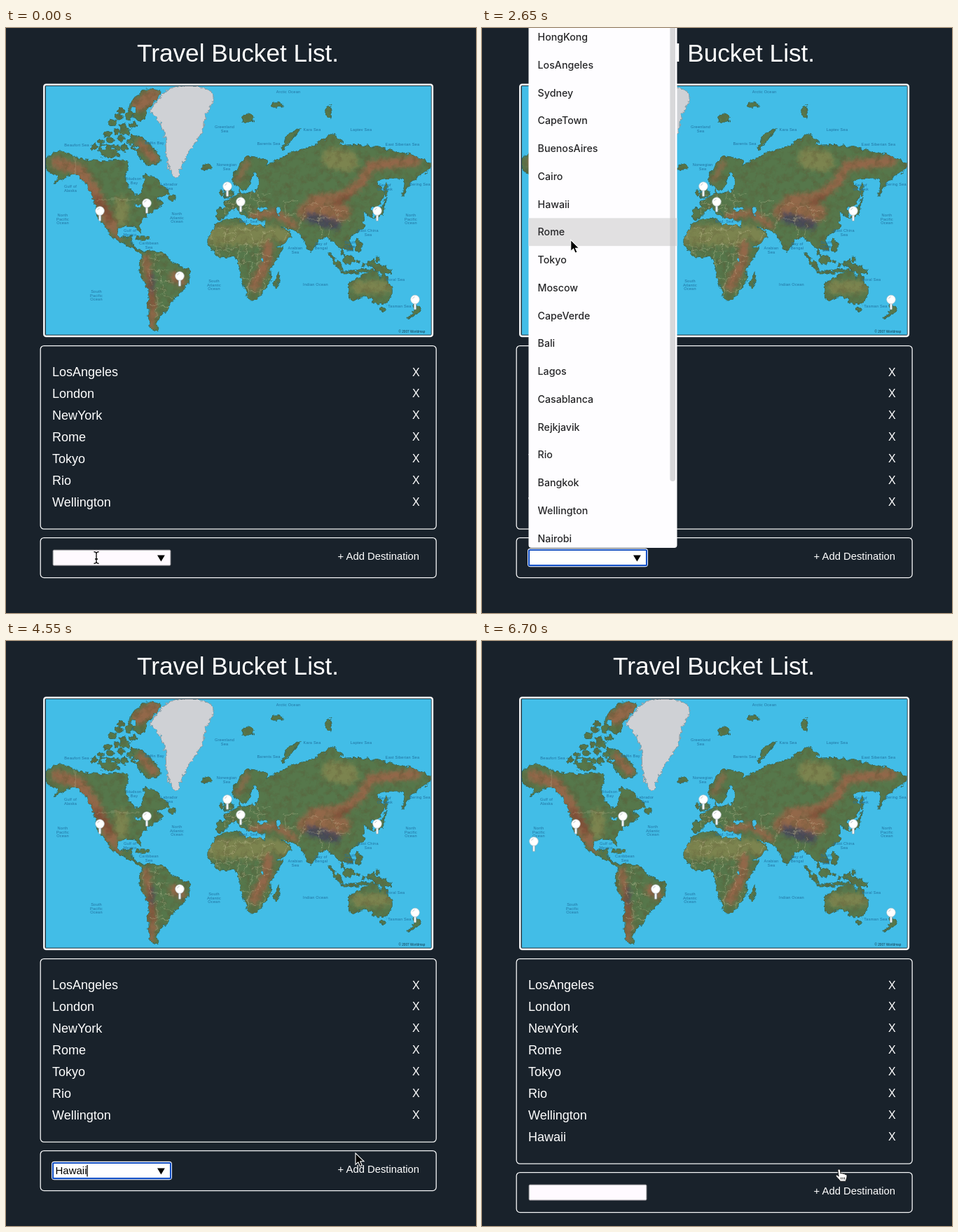
Write an HTML page that moves like this. It is 671x835 px and loops after 7050 ms.

```html
<!DOCTYPE html>
<html lang="en">
<head>
<meta charset="utf-8">
<title>Travel Bucket List</title>
<style>
html, body { margin: 0; width: 100%; height: 100%; overflow: hidden; background: #19222b; }
svg { position: absolute; left: 0; top: 0; width: 671px; height: 835px; }
#map { will-change: transform; }
text { font-family: "Liberation Sans", Arial, sans-serif; fill: #fff; }
.item { font-size: 18px; }
.cross { font-size: 16px; }
.sea { font-size: 5.6px; fill: #20719f; letter-spacing: .22px; text-anchor: middle; }
.option { font-family: Inter, Roboto, sans-serif; font-size: 14.2px; font-weight: 500; fill: #262628; }
.panel { fill: none; stroke: #f4f5f6; stroke-width: 1.3; }
</style>
</head>
<body>
<svg id="map" viewBox="0 0 671 835">
  <defs>
    <clipPath id="landClip"><path id="landShape"/></clipPath>
    <clipPath id="frameClip"><rect x="57" y="83" width="549.8" height="354.8"/></clipPath>
    <filter id="coast" filterUnits="userSpaceOnUse" x="50" y="76" width="564" height="370" color-interpolation-filters="sRGB">
      <feTurbulence type="fractalNoise" baseFrequency=".15" numOctaves="3" seed="4"/>
      <feColorMatrix values="1 0 0 0 0  0 1 0 0 0  0 0 1 0 0  0 0 0 0 1" result="n"/>
      <feDisplacementMap in="SourceGraphic" in2="n" scale="8" xChannelSelector="R" yChannelSelector="G"/>
    </filter>
    <filter id="soft" filterUnits="userSpaceOnUse" x="50" y="76" width="564" height="370"><feGaussianBlur stdDeviation="3"/></filter>
    <filter id="grain" filterUnits="userSpaceOnUse" x="50" y="76" width="564" height="370" color-interpolation-filters="sRGB">
      <feTurbulence type="fractalNoise" baseFrequency=".1" numOctaves="4" seed="9"/>
      <feColorMatrix values="0 0 0 0 .36  0 0 0 0 .33  0 0 0 0 .2  2 0 0 0 -.9"/>
    </filter>
  </defs>
  <rect width="671" height="835" fill="#19222b"/>
  <text x="187" y="47.5" font-size="35.2">Travel Bucket List.</text>
  <rect x="54.3" y="80.8" width="554.6" height="359.2" rx="3" fill="#1b3440" stroke="#f6f7f7" stroke-width="2.5"/>
  <g clip-path="url(#frameClip)">
    <rect x="57" y="83" width="550" height="355" fill="#42bde7"/>
    <g filter="url(#coast)">
      <path id="shore" stroke="#34685e" stroke-width="1.6" stroke-linejoin="round"/>
      <g clip-path="url(#landClip)">
        <rect x="50" y="76" width="564" height="370" fill="#56774b"/>
        <g id="terrain" filter="url(#soft)" fill="none" stroke-linecap="round"></g>
        <rect x="50" y="76" width="564" height="370" filter="url(#grain)" opacity=".6"/>
        <path id="borders" fill="none" stroke="#e3d9b4" stroke-opacity=".4" stroke-width=".7"/>
      </g>
      <path id="ice" fill="#cfd1d5" stroke="#8a999f"/>
      <path id="lakes" fill="#42bde7" stroke="#34685e" stroke-width=".7"/>
    </g>
    <g id="seas"></g>
    <text x="560.5" y="434.8" font-size="4.7" style="fill:#12384a">© 2007 Worldmap</text>
  </g>
</svg>
<svg id="ui" viewBox="0 0 671 835">
  <g id="pins"></g>
  <rect id="listBox" class="panel" x="49.2" y="453.6" width="565" height="261.6" rx="5"/>
  <g id="list"></g>
  <g id="form">
    <rect class="panel" x="49.2" y="727.6" width="565" height="57" rx="5"/>
    <rect id="ring" x="65" y="742.8" width="172" height="26.4" rx="4" fill="#fff"/>
    <rect id="field" x="67" y="745" width="168" height="22.2" rx="1.5"/>
    <text id="value" x="70.5" y="761" font-size="15" style="fill:#000">Hawaii</text>
    <path id="caret" stroke="#000" stroke-width="1.3"/>
    <path id="drop" d="M216 752.4H226.8L221.4 761.4Z" fill="#000"/>
    <text x="473.6" y="759" font-size="14.8">+ Add Destination</text>
  </g>
  <g id="menu">
    <path d="M66.5 -5H278.5V738Q278.5 742 274.5 742H70.5Q66.5 742 66.5 738Z" fill="#fefdff"/>
    <rect id="hover" x="66.5" width="212" height="39.8" fill="#e1e0e1"/>
    <g id="options"></g>
    <rect id="bar" x="268.4" y="-10" width="7.6" height="657" rx="3.8" fill="#c6c6c8"/>
  </g>
  <g id="cursor">
    <path id="beam" d="M-3.6 -8.4Q-.4 -8.4 0 -6Q.4 -8.4 3.6 -8.4M0 -6.5V6.5M-3.6 8.4Q-.4 8.4 0 6Q.4 8.4 3.6 8.4M-2 2H2" fill="none" stroke="#000" stroke-width="1.3"/>
    <path id="arrow" d="M0 0V16.2L3.8 12.8 6.4 18.8 9.3 17.5 6.8 11.8H12Z" fill="#000" stroke="#fff" stroke-width="1.1"/>
    <path id="hand" d="M-2 1.5C-2 -.4 1.2 -.4 1.4 1.4L2 6.2C3.3 5 5 5.4 5.3 6.7 6.6 5.9 8.1 6.5 8.4 7.7 9.7 7.2 11 8 11 9.6 11.2 12.5 9.8 14 9.4 17.2H1.6C0 14.5 -2.6 12.6 -4.6 9.9 -5.2 8.4 -3.2 7.6 -2 9L-.8 10.2ZM2.7 11.5V14.5M5.2 11.5V14.5M7.6 11.5V14.5" fill="#fff" stroke="#111" stroke-width=".9" stroke-linejoin="round"/>
  </g>
</svg>
<script>
const $ = id => document.getElementById(id);
const set = (el, attrs) => { for (const k in attrs) el.setAttribute(k, attrs[k]); return el; };
const make = (parent, tag, attrs, text) => {
  const el = set(document.createElementNS('http://www.w3.org/2000/svg', tag), attrs);
  if (text) el.textContent = text;
  parent.appendChild(el);
  return el;
};
const show = (el, on) => el.setAttribute('visibility', on ? 'inherit' : 'hidden');

let seed = 7;
const rand = () => (seed = seed * 16807 % 2147483647) / 2147483647;
const jitter = r => (rand() - .5) * 2 * r;

// closed smooth curve through a few key points
function blob(text) {
  const n = text.split(' ').map(Number), count = n.length / 2;
  const at = i => { const k = (i + count) % count * 2; return [n[k], n[k + 1]]; };
  let d = 'M' + at(0);
  for (let i = 0; i < count; i++) {
    const [a, b, c, e] = [at(i - 1), at(i), at(i + 1), at(i + 2)];
    const bend = (p, q, r, s) => [0, 1].map(j => p[j] + s * (r[j] - q[j]) / 8);
    d += `C${bend(b, a, c, 1)} ${bend(c, b, e, -1)} ${c}`;
  }
  return d + 'Z';
}
const oval = (x, y, a, b) => `M${x - a} ${y}a${a} ${b} 0 1 0 ${2 * a} 0a${a} ${b} 0 1 0 ${-2 * a} 0Z`;

const coasts = {
  northAmerica: '58 186 77 176 112 188 150 190 174 191 170 217 188 240 196 226 199 208 214 216 232 235 216 243 222 251 198 269 191 281 192 293 185 284 163 284 159 296 172 300 180 296 178 304 187 316 198 319 194 323 174 310 153 300 141 281 132 272 127 248 112 220 96 208 70 221 75 212 60 204',
  southAmerica: '198 320 222 321 241 337 263 349 255 371 241 384 231 400 217 415 216 431 206 426 203 400 204 374 190 346',
  ellesmere: '178 108 198 88 221 92 204 114 194 132 178 122',
  baffin: '178 152 203 164 220 188 202 196 188 178',
  victoria: '133 168 153 169 160 183 138 183',
  novaya: '394 174 402 155 420 143 404 164',
  britain: '313 241 316 222 325 238',
  madagascar: '382 366 391 349 386 371',
  japan: '526 271 537 258 541 244 538 265',
  sumatra: '461 321 480 342 476 345',
  guinea: '516 333 540 340 551 350 528 346',
  zealand: '583 394 591 401 586 409 572 414 584 404',
  australia: '490 372 492 363 518 349 530 348 534 358 538 348 550 373 544 391 528 393 516 383 494 388',
  africa: '302 278 330 272 348 282 370 285 387 314 396 313 378 343 378 360 360 385 347 387 337 357 328 327 305 327 289 306',
  europe: '302 270 301 259 313 257 312 248 331 238 334 230 338 237 356 233 362 221 354 205 346 226 340 231 325 220 326 206 346 184 372 190 372 197 398 185 412 210 405 270 372 276 358 272 346 270 338 258 343 270 326 258 308 272',
  siberia: '398 186 418 175 440 168 464 152 480 161 478 167 508 167 546 174 572 180 606 193 598 206 577 220 566 240 568 216 530 218 540 236 528 252 470 262 402 256',
  asia: '530 248 521 258 524 270 510 262 510 284 490 300 494 315 480 316 484 330 475 312 460 299 446 303 434 318 420 294 390 282 406 294 400 305 382 312 370 284 376 270 400 240'
};
const isles = [
  [237, 242, 5, 4], [195, 300, 10, 2], [287, 199, 7, 4], [345, 129, 9, 6], [386, 110, 8, 3], [461, 120, 4, 9],
  [308, 235, 3, 4], [503, 311, 4, 10], [489, 331, 7, 7], [537, 402, 3, 2.5], [543, 230, 2, 10]
];
// scattered islands: Arctic archipelago, then the Indonesian arc
for (let y = 116; y < 182; y += 11)
  for (let x = 170 - (y - 112) * .75; x < 182; x += 14)
    isles.push([x + jitter(3), y + jitter(3), 5 + jitter(1.5), 4 + jitter(1)]);
for (let x = 484; x < 520; x += 7)
  isles.push([x, 348 + jitter(2), 4, 1.4], [x + 12, 334 + jitter(5), 2, 2.4]);

const land = Object.values(coasts).map(blob).join('') + isles.map(p => oval(...p)).join('');
$('landShape').setAttribute('d', land);
$('shore').setAttribute('d', land);
$('ice').setAttribute('d', blob('206 117 232 88 262 81 294 92 294 108 285 124 280 148 262 176 252 194 244 214 234 204 229 180 227 154 216 128'));
$('lakes').setAttribute('d', oval(366, 258, 7, 3) + oval(389, 260, 3, 7) + oval(189, 253, 5, 2) + oval(366, 331, 2.4, 2.8));

// soft ridges: colour, width, course
const ridges = {
  '#7b8450': ['30 M300 296H362', '20 M380 290L396 298', '18 M502 370H540', '30 M466 186L488 190', '20 M165 250V272'],
  '#93684a': ['17 M72 192L106 203 128 238 150 282', '8 M150 282L160 300', '20 M190 110L210 96', '12 M192 165L212 188', '11 M199 328L205 360 210 400 206 425',
    '15 M374 310L372 335 354 368', '14 M240 355L250 362', '10 M352 268L385 264 412 282', '24 M428 262L480 264', '14 M436 246L482 240 506 222 522 196 585 190', '6 M330 218L345 192'],
  '#7d4b34': ['9 M129 242L150 272', '5 M204 350L210 400', '7 M470 250L490 240'],
  '#474958': ['15 M434 270L470 281', '4 M209 352V376']
};
for (const stroke in ridges) for (const ridge of ridges[stroke]) {
  const [width, ...d] = ridge.split(' ');
  make($('terrain'), 'path', { d: d.join(' '), stroke, 'stroke-width': width });
}

// wobbly mesh of frontiers, cut to the land
function mesh(x, y, w, h, step) {
  let d = '';
  for (let i = x; i < x + w; i += step)
    for (let j = y; j < y + h; j += step) {
      const s = step * .3;
      d += `M${i + jitter(s)} ${j + jitter(s)}l${step} ${jitter(s)}M${i + jitter(s)} ${j + jitter(s)}l${jitter(s)} ${step}`;
    }
  return d;
}
$('borders').setAttribute('d', 'M129 245H192M99 184V209' + mesh(296, 288, 84, 90, 17) + mesh(310, 235, 55, 34, 13) + mesh(200, 326, 36, 80, 18) + mesh(400, 254, 80, 36, 22));

const seas = [
  [403,91,'Arctic Ocean'], [312,141,'Greenland|Sea'], [437,145,'Kara Sea'], [507,145,'Laptev Sea'], [375,165,'Barents Sea'],
  [566,166,'East Siberian Sea'], [101,167,'Beaufort Sea'], [212,164,'Baffin Bay'], [315,195,'Norwegian|Sea'], [183,215,'Hudson|Bay'],
  [233,223,'Labrador|Sea'], [92,226,'Gulf of|Alaska'], [591,223,'Bering Sea'], [541,224,'Sea of|Okhotsk'], [81,267,'North|Pacific|Ocean'],
  [244,265,'North|Atlantic|Ocean'], [578,267,'North|Pacific|Ocean'], [177,289,'Gulf of|Mexico'], [204,307,'Caribbean|Sea'],
  [129,376,'South|Pacific|Ocean'], [297,361,'South|Atlantic|Ocean'], [442,366,'Indian Ocean'], [413,314,'Arabian|Sea'],
  [450,308,'Bay of|Bengal'], [491,306,'South|China|Sea'], [517,289,'East China|Sea'], [556,359,'Coral Sea'], [562,397,'Tasman Sea'], [346,276,'Med. Sea']
];
for (const [x, y, name] of seas)
  name.split('|').forEach((line, i) => make($('seas'), 'text', { class: 'sea', x, y: y + 2 + i * 5.5 }, line));

const pin = (x, y) => {
  const g = make($('pins'), 'g', { transform: `translate(${x} ${y})` });
  make(g, 'rect', { x: -1.7, y: 4, width: 3.4, height: 10.4, rx: 1, fill: '#f4f4f4', stroke: '#6d93a0', 'stroke-width': .6 });
  make(g, 'circle', { r: 6.3, fill: '#fff', stroke: '#b9c6cc', 'stroke-width': .7 });
  make(g, 'path', { d: 'M-3.4 -1Q-2.8 -3.4 -.4 -3.8', fill: 'none', stroke: '#c4c9cc', 'stroke-width': 1 });
  return g;
};
const row = (name, i) => {
  const g = make($('list'), 'g', {}), y = 497 + i * 30.95;
  make(g, 'text', { class: 'item', x: 66, y }, name);
  make(g, 'text', { class: 'cross', x: 580, y: y - .5 }, 'X');
  return g;
};
const places = {
  LosAngeles: [134, 261], London: [316, 226], NewYork: [201, 250], Rome: [335, 248],
  Tokyo: [530, 261], Rio: [248, 354], Wellington: [584, 387.5], Hawaii: [74, 286]
};
const added = Object.keys(places).map((name, i) => [pin(...places[name]), row(name, i)]).pop();

const PITCH = 39.75;
'HongKong LosAngeles Sydney CapeTown BuenosAires Cairo Hawaii Rome Tokyo Moscow CapeVerde Bali Lagos Casablanca Rejkjavik Rio Bangkok Wellington Nairobi'
  .split(' ').forEach((name, i) => make($('options'), 'text', { class: 'option', x: 79.6, y: 18 + i * PITCH }, name));

const LOOP = 7050, STEP = 50;
const OPEN = 900, PICK = 3450, BLUR = 5000, ADD = 5950;
// pointer stops: arrive, leave, x, y
const stops = [[0, 1500, 129, 756], [1800, 2250, 118, 382.5], [2900, 3700, 131, 263], [4450, 4600, 499, 731], [4850, LOOP, 510, 754]];
const ease = u => u * u * (3 - 2 * u);
function pointer(t) {
  const i = stops.findIndex(s => t <= s[1]), [arrive, , x, y] = stops[i];
  if (t >= arrive) return [x, y];
  const [, leave, x0, y0] = stops[i - 1], u = ease((t - leave) / (arrive - leave));
  return [x0 + (x - x0) * u, y0 + (y - y0) * u];
}

function draw(t) {
  const open = t >= OPEN && t < PICK, focus = t >= OPEN && t < BLUR, done = t >= ADD;
  const filled = t >= PICK && !done, shift = done ? 31 : 0;
  const [x, y] = pointer(t);
  const kind = t < 1550 ? 'beam' : t < 4800 ? 'arrow' : 'hand';

  added.forEach(el => show(el, done));
  $('listBox').setAttribute('height', 261.6 + shift);
  $('form').setAttribute('transform', `translate(0 ${shift})`);

  show($('ring'), focus);
  set($('field'), focus
    ? { fill: '#fff', stroke: '#1450c4', 'stroke-width': 2.2 }
    : { fill: '#fffaff', stroke: '#77787c', 'stroke-width': 1 });
  show($('value'), filled);
  show($('drop'), t < BLUR);
  show($('caret'), focus && (t - (filled ? PICK : OPEN)) % 1000 < 500);
  $('caret').setAttribute('d', `M${filled ? 116 : 71.5} 748V764.5`);

  show($('menu'), open);
  show($('hover'), kind === 'arrow' && open && y < 742);
  $('hover').setAttribute('y', Math.floor((y + 6.9) / PITCH) * PITCH - 6.9);
  show($('bar'), open && t >= 2600);
  $('bar').setAttribute('opacity', Math.min(1, Math.max(0, (t - 2550) / 150)));

  $('cursor').setAttribute('transform', `translate(${x} ${y})`);
  for (const k of ['beam', 'arrow', 'hand']) show($(k), k === kind);
}

const start = performance.now();
function tick() {
  const t = (performance.now() - start) % LOOP;
  draw(Math.floor(t / STEP) * STEP);
  requestAnimationFrame(tick);
}
draw(0);
requestAnimationFrame(tick);
</script>
</body>
</html>
```
